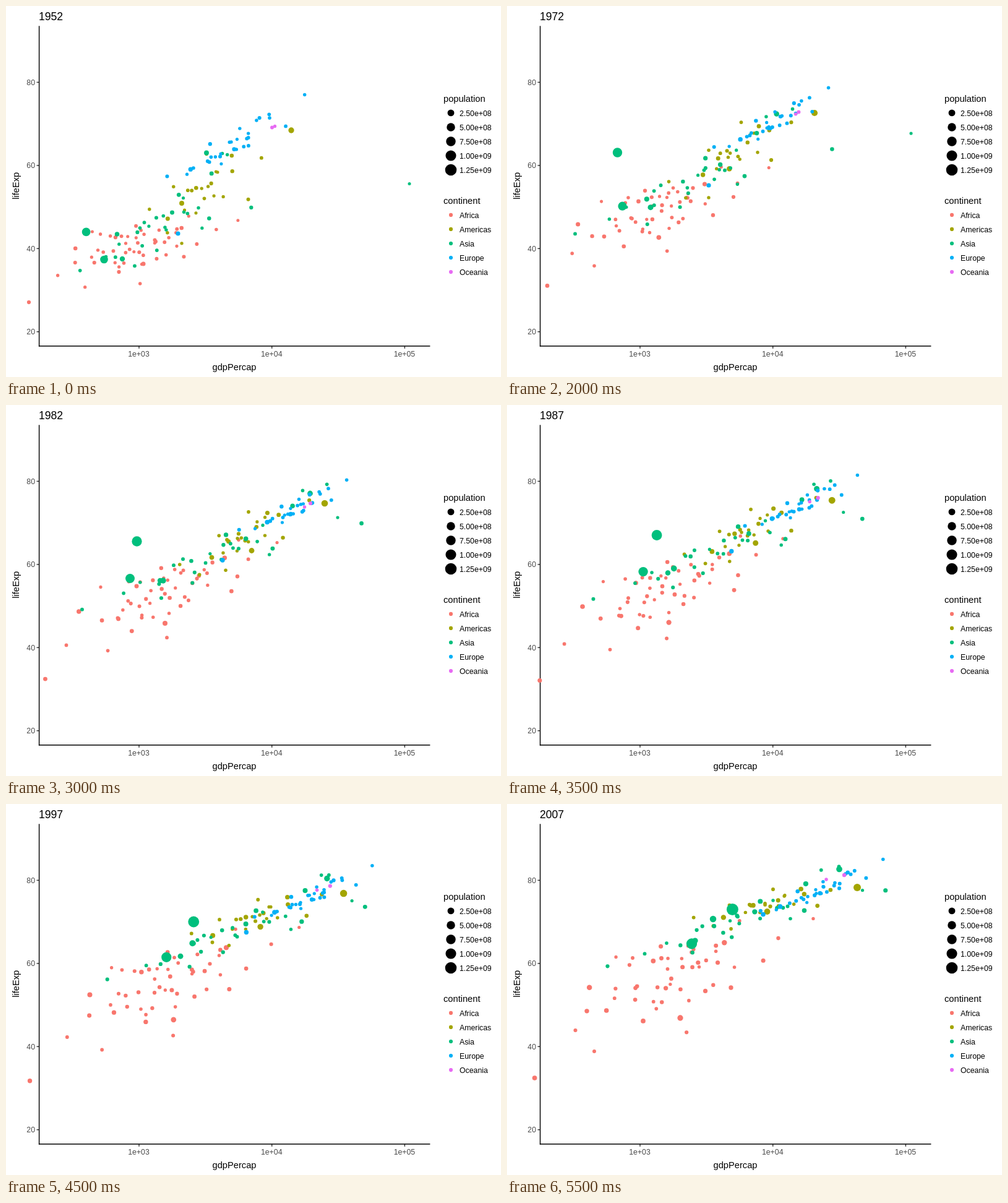
These frames come from a looping animation (800 px wide and 600 px high, 6000 ms). An HTML page with a canvas:

```html
<!DOCTYPE html>
<html lang="en">
<head>
<meta charset="utf-8">
<title>Life expectancy and income</title>
<style>
html, body { margin: 0; width: 100%; height: 100%; overflow: hidden; background: #fff; }
canvas { display: block; }
</style>
</head>
<body>
<canvas id="stage" width="800" height="600"></canvas>
<script>
const ctx = document.getElementById('stage').getContext('2d');
const STEP = 500, LAST = 11, KEYS = [0, 6, LAST];
const HUE = { Africa: '#F8766D', Americas: '#A3A500', Asia: '#00BF7D', Europe: '#00B0F6', Oceania: '#E76BF3' };
const GROWTH = { Africa: 4, Americas: 2.6, Asia: 2.5, Europe: 1.4, Oceania: 2 };

const radius = mil => 2.36 + 7.11 * Math.sqrt(mil / 1318);
const dots = [];

let seed = 1952;
function rand() {
  seed = (seed * 16807) % 2147483647;
  return seed / 2147483647;
}

// Bell-shaped value for a share p between 0 and 1.
const bell = p => 0.55 * Math.log(p / (1 - p));

// Row of values at step k, blended between the rows set for some steps.
function blend(rows, steps, k) {
  let i = 0;
  while (i < steps.length - 2 && steps[i + 1] < k) i++;
  const u = (k - steps[i]) / (steps[i + 1] - steps[i]);
  return rows[i].map((v, j) => v + (rows[i + 1][j] - v) * u);
}

// Many small countries. Rows: mean x, spread x, mean y, rise of y with x, spread y.
function cloud(continent, count, rows) {
  for (let i = 0; i < count; i++) {
    const rank = bell((i + 0.5) / count);
    const rest = bell(0.04 + 0.92 * rand());
    const phase = rand() * 2 * Math.PI;
    const mil = 7 * Math.exp(1.1 * bell(0.03 + 0.94 * rand()));
    const at = k => {
      const [mx, sx, my, rise, sy] = blend(rows, KEYS, k);
      const z = rank + 0.15 * Math.sin(0.7 * k + phase);
      return [mx + sx * z, my - rise * z - sy * rest];
    };
    dots.push({ continent, mil, at });
  }
}

// One large or far-off country on its own path.
function track(continent, mil, points, steps = KEYS) {
  dots.push({ continent, mil, at: k => blend(points, steps, k) });
}

cloud('Africa', 51, [[209, 64, 398, 12, 31], [254, 77, 314, 28, 38], [264, 86, 293, 28, 50]]);
track('Africa', 68, [[222, 417], [257, 353], [280, 346]]);

cloud('Americas', 23, [[320, 45, 303, 38, 42], [385, 47, 215, 33, 26], [414, 56, 166, 18, 16]]);
track('Americas', 104, [[284, 319], [397, 235.5], [420.5, 174]]);
track('Americas', 218, [[461, 201], [515, 159], [566, 135]]);

cloud('Asia', 27, [[258, 68, 349, 35, 40], [348, 100, 239, 38, 32], [388, 104, 184, 34, 24]]);
track('Asia', 84, [[179.5, 369], [249, 284], [304, 221]]);
track('Asia', 138, [[188, 409], [254, 284], [333, 186]]);
track('Asia', 104, [[324, 237.5], [491.5, 143], [537, 105.5]]);
track('Asia', 1, [[652, 287.5], [653, 206], [536, 182], [574.5, 139.5]], [0, 4, 6, LAST]);
track('Asia', 650, [[158.5, 410], [200.5, 280.5], [298.5, 226]]);
track('Asia', 834, [[129.6, 365.4], [148, 362], [178.5, 237], [211.5, 220.5], [364.4, 170.5]], [0, 2, 4, 6, LAST]);

cloud('Europe', 29, [[365, 50, 224, 24, 14], [466, 38, 168, 14, 9], [508, 46, 138, 16, 8]]);
track('Europe', 42, [[278, 368], [350, 251], [414, 178.5]]);

track('Oceania', 13, [[430, 196.5], [492, 159], [545, 115]]);
track('Oceania', 3, [[434.5, 194.5], [482.5, 165], [516, 122]]);

function disc(x, y, r, color) {
  ctx.fillStyle = color;
  ctx.beginPath();
  ctx.arc(x, y, r, 0, Math.PI * 2);
  ctx.fill();
}

function text(str, x, y, size, align = 'left', color = '#000') {
  ctx.font = size + 'px "Liberation Sans", Arial, sans-serif';
  ctx.textAlign = align;
  ctx.fillStyle = color;
  ctx.fillText(str, x, y);
}

function line(x0, y0, x1, y1, color) {
  ctx.strokeStyle = color;
  ctx.lineWidth = 1.42;
  ctx.beginPath();
  ctx.moveTo(x0, y0);
  ctx.lineTo(x1, y1);
  ctx.stroke();
}

function axes() {
  for (let i = 0; i < 4; i++) {
    const y = 123.4 + i * 134.46;
    line(49.5, y, 53.5, y, '#333');
    text(80 - 20 * i, 47, y + 4.6, 12.3, 'right', '#4D4D4D');
  }
  for (let i = 0; i < 3; i++) {
    const x = 215 + i * 214.7;
    line(x, 550, x, 554, '#333');
    text('1e+0' + (3 + i), x - 0.5, 567, 12.3, 'center', '#4D4D4D');
  }
  line(53.6, 32.3, 53.6, 550.7, '#000');
  line(52.9, 550, 685.4, 550, '#000');
  text('gdpPercap', 369, 589, 14.67, 'center');
  ctx.save();
  ctx.translate(21, 290.8);
  ctx.rotate(-Math.PI / 2);
  text('lifeExp', 0, 0, 14.67, 'center');
  ctx.restore();
}

function legend(title, top, entries) {
  text(title, 707, top, 14.67);
  entries.forEach(([label, r, color], i) => {
    const y = top + 17.9 + i * 23.04;
    disc(719, y, r, color);
    text(label, 733, y + 4.8, 12.3);
  });
}

const sizes = ['2.50e+08', '5.00e+08', '7.50e+08', '1.00e+09', '1.25e+09']
  .map((label, i) => [label, radius(250 * (i + 1)), '#000']);
const hues = Object.entries(HUE).map(([name, color]) => [name, 3.08, color]);

function draw(k) {
  ctx.fillStyle = '#fff';
  ctx.fillRect(0, 0, 800, 600);
  axes();
  for (const { continent, at, mil } of dots) {
    const [x, y] = at(k);
    disc(x, y, radius(mil * GROWTH[continent] ** (k / LAST - 0.5)), HUE[continent]);
  }
  legend('population', 155, sizes);
  legend('continent', 320, hues);
  text(1952 + 5 * k, 53, 23, 17.6);
}

const start = performance.now();
function tick(now) {
  draw(Math.floor(Math.max(0, now - start) / STEP) % (LAST + 1));
  requestAnimationFrame(tick);
}
tick(start);
</script>
</body>
</html>
```
